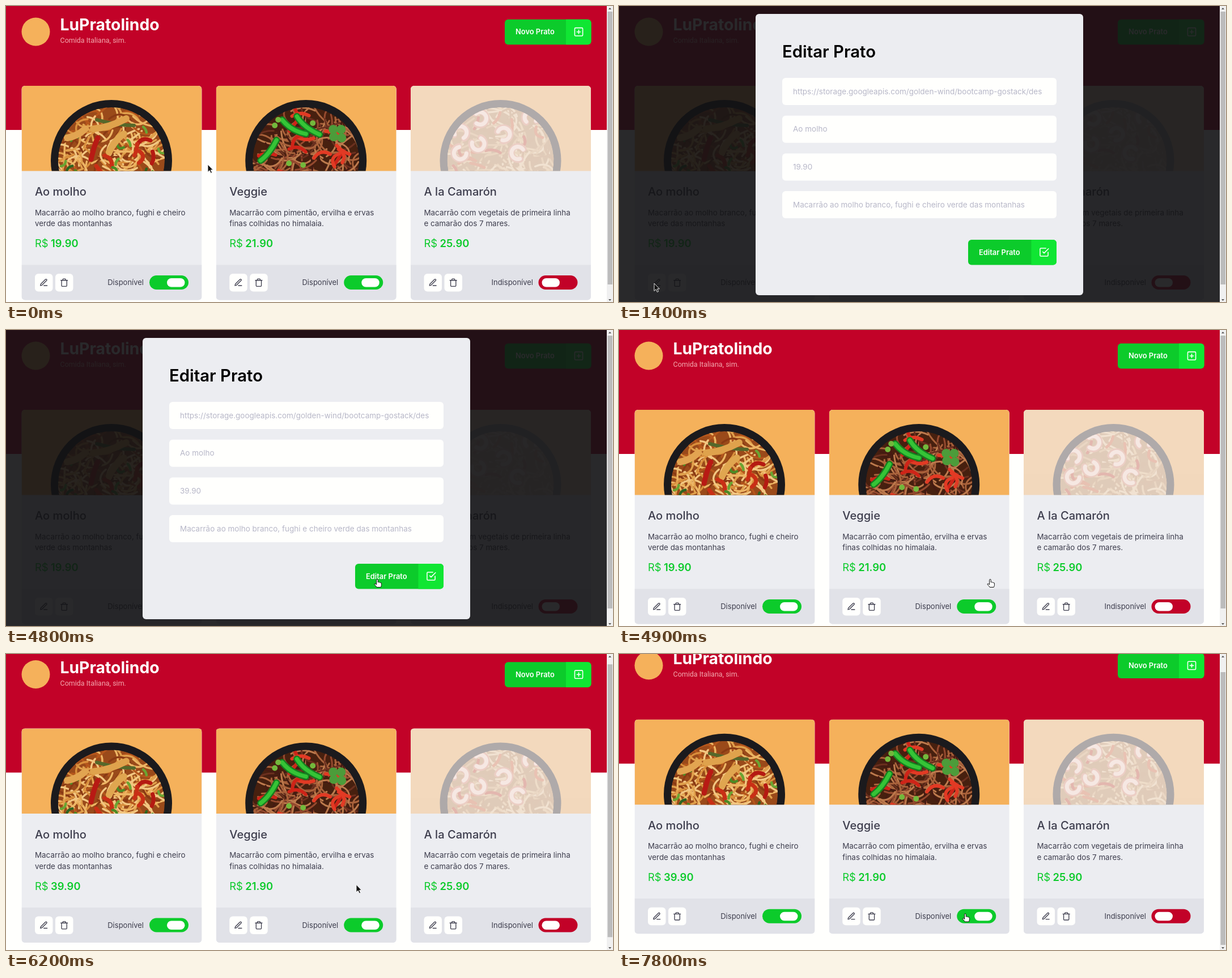
An HTML page for the animation above (8000 ms loop, 1071 by 523 pixels).

```html
<!DOCTYPE html>
<html lang="pt">
<head>
<meta charset="utf-8">
<title>Painel de pratos</title>
<style>
  html, body { margin: 0; width: 100%; height: 100%; overflow: hidden; background: #fffffd; }
  svg { display: block; }
  text { font-family: Inter, "Open Sans", sans-serif; font-size: 13.4px; fill: #3d3d4d; white-space: pre; }
  .brand { font-size: 28.3px; font-weight: 700; fill: #fff; }
  .tagline { font-family: Roboto, sans-serif; font-size: 12.5px; fill: #f3a9ae; }
  .dish { font-size: 20.1px; font-weight: 500; }
  .price { font-size: 18.4px; fill: #0ccb2b; }
  .bold { font-weight: 600; }
  .status { font-size: 13px; text-anchor: end; }
  .button { font-size: 12.9px; font-weight: 600; fill: #fff; }
  .heading { font-size: 29.3px; font-weight: 600; fill: #000; }
  .field { font-size: 13.5px; fill: #b7b7c8; }
  .icon { fill: none; stroke-width: 2; stroke-linecap: round; stroke-linejoin: round; }
</style>
</head>
<body>
<svg id="stage" width="1071" height="523" viewBox="0 0 1071 523"></svg>
<script>
const LOOP = 8000;
const GREEN = '#0ccb2b', RED = '#c20228', ORANGE = '#f5b15b';

const ICONS = {
  edit: 'M12 20h9M16.5 3.5a2.12 2.12 0 0 1 3 3L7 19l-4 1 1-4z',
  trash: 'M3 6h18M19 6v14a2 2 0 0 1-2 2H7a2 2 0 0 1-2-2V6m3 0V4a2 2 0 0 1 2-2h4a2 2 0 0 1 2 2v2',
  plus: 'M5 3h14a2 2 0 0 1 2 2v14a2 2 0 0 1-2 2H5a2 2 0 0 1-2-2V5a2 2 0 0 1 2-2zM12 8v8M8 12h8',
  check: 'M9 11l3 3L22 4M21 12v7a2 2 0 0 1-2 2H5a2 2 0 0 1-2-2V5a2 2 0 0 1 2-2h11'
};

const rect = (x, y, w, h, fill, r = 0, extra = '') =>
  `<rect x="${x}" y="${y}" width="${w}" height="${h}" rx="${r}" fill="${fill}" ${extra}/>`;
const text = (x, y, cls, content, extra = '') =>
  `<text x="${x}" y="${y}" class="${cls}" ${extra}>${content}</text>`;
const icon = (name, cx, cy, scale, color) =>
  `<path class="icon" d="${ICONS[name]}" stroke="${color}" transform="translate(${cx} ${cy}) scale(${scale}) translate(-12 -12)"/>`;
const line = (d, color, width) =>
  `<path d="${d}" fill="none" stroke="${color}" stroke-width="${width}" stroke-linecap="round"/>`;
const dots = (points, r, color) =>
  points.map(([x, y]) => `<circle cx="${x}" cy="${y}" r="${r}" fill="${color}"/>`).join('');
const pod = (d, width) => line(d, '#14801f', width) + line(d, '#35c436', width * 0.6);

function button(x, y, w, label, iconName) {
  return rect(x, y, w, 44.5, GREEN, 6) +
    `<path d="M${x + w - 44.5} ${y}h38.5a6 6 0 0 1 6 6v32.5a6 6 0 0 1-6 6h-38.5z" fill="#10e633"/>` +
    text(x + 19, y + 26.5, 'button', label) + icon(iconName, x + w - 22, y + 22, 0.785, '#fff');
}

function randomFrom(seed) {
  return () => {
    seed = (seed * 1664525 + 1013904223) % 4294967296;
    return seed / 4294967296;
  };
}

// Short curved strokes scattered over the bowl, which is centred on 0,0.
function strands(rand, count, length, width, colors) {
  let out = '';
  for (let i = 0; i < count; i++) {
    const angle = rand() * Math.PI * 2, radius = 92 * Math.sqrt(rand()), turn = rand() * Math.PI * 2;
    const dx = length * Math.cos(turn), dy = length * Math.sin(turn) * 0.8, bend = (rand() - 0.5) * 1.4;
    const x = radius * Math.cos(angle) - dx / 2, y = radius * Math.sin(angle) - dy / 2;
    const color = colors[Math.floor(rand() * colors.length)];
    const [a, b, c, d, e, f] = [x, y, dx / 2 - dy * bend, dy / 2 + dx * bend, dx, dy].map(v => v.toFixed(1));
    out += line(`M${a} ${b}q${c} ${d} ${e} ${f}`, color, width);
  }
  return out;
}

const FOODS = [
  r => strands(r, 200, 40, 3.4, ['#d98f3c', '#edb564', '#b5561c', '#f2c681', '#e0a04c', '#8a3a14']) +
    strands(r, 12, 26, 7, ['#b51a12', '#c92f16']) +
    strands(r, 20, 14, 4.5, ['#4d8a24', '#6ba432', '#2f6420']) +
    line('M-26 -72q36 10 66 10', '#55682a', 6) +
    line('M-32 -56q28-2 58-18', '#dfa24c', 12) + line('M-78 -40q18-3 32-16', '#e2a451', 12) +
    line('M-4 -15q12-24 26-32', '#e0a650', 12) + line('M-36 -2q6-26 12-38', '#b81a14', 9),
  r => strands(r, 200, 42, 3, ['#6b301f', '#94492e', '#a9623b', '#451a12', '#bd7a4d']) +
    strands(r, 18, 30, 6, ['#cf2418', '#e23a24']) +
    pod('M-42 -72q16 20 42 25', 12) + pod('M-16 -78q12 20 40 32', 12) + pod('M-80 0q16-12 28-36', 12) +
    dots([[48, -55], [62, -55], [49, -42], [63, -40]], 8, '#4c9c3a') +
    dots([[-55, -62], [-49, -72], [-30, 5], [-5, 8], [12, -66]], 5, '#73b83c'),
  r => strands(r, 190, 40, 3.4, ['#d9ab72', '#efcf9f', '#b9844e', '#e6bd83']) +
    strands(r, 18, 26, 5, ['#c2452e', '#d4673a', '#5f9038']) +
    [[-72, -50], [-36, -76], [-38, -30], [-70, -12], [30, -12], [52, -76], [5, -48]].map(([x, y], i) =>
      `<g transform="translate(${x} ${y}) rotate(${i * 67})">${line('M-10 5a12 12 0 1 1 18 6', '#dd8f74', 11)}${line('M-9 4a11 11 0 1 1 16 6', '#ffe3d4', 7)}</g>`).join('')
];

const DISHES = [
  { name: 'Ao molho', lines: ['Macarrão ao molho branco, fughi e cheiro', 'verde das montanhas'], price: '19.90', on: true },
  { name: 'Veggie', lines: ['Macarrão com pimentão, ervilha e ervas', 'finas colhidas no himalaia.'], price: '21.90', on: true },
  { name: 'A la Camarón', lines: ['Macarrão com vegetais de primeira linha', 'e camarão dos 7 mares.'], price: '25.90', on: false }
];

function card(dish, i) {
  const picture = `${rect(0, 0, 318, 150.5, '#f2ebe9')}<svg width="318" height="150.5" opacity="${dish.on ? 1 : 0.31}">
    ${rect(0, 0, 318, 151, ORANGE)}
    <g transform="translate(158.5 132)">
      <circle r="107" fill="#1b1a1d"/>
      <g clip-path="url(#bowl)"><circle r="94" fill="${['#9a4a1a', '#47200f', '#b88750'][i]}"/>${FOODS[i](randomFrom(11 + i * 31))}</g>
    </g></svg>`;
  const actions = ['edit', 'trash'].map((name, k) =>
    rect(23.5 + k * 36, 332, 31.5, 31.5, '#fffffd', 6) + icon(name, 39.2 + k * 36, 347.7, 0.66, '#3d3d4d')).join('');
  return `<g transform="translate(${27.5 + i * 343.25} 141)"><g clip-path="url(#card)">
    ${rect(0, 0, 318, 379, '#ecedf1')}${picture}${rect(0, 316.5, 318, 63, '#e1e2e8')}</g>
    ${text(23.5, 194, 'dish', dish.name)}
    ${dish.lines.map((s, k) => text(23.5, 228.5 + k * 19.5, '', s)).join('')}
    ${text(23.5, 285, 'price', 'R$')}${text(51.5, 285, 'price bold', dish.price, `id="price${i}"`)}
    ${actions}${text(dish.on ? 215.5 : 216, 352, 'status', dish.on ? 'Disponível' : 'Indisponível')}
    ${rect(225.5, 335, 69, 25, dish.on ? GREEN : RED, 12.5)}
    ${rect(dish.on ? 256.5 : 231.5, 340, 31.5, 15.5, '#fffffd', 7.75)}
  </g>`;
}

const FIELDS = [
  'https://storage.googleapis.com/golden-wind/bootcamp-gostack/des',
  'Ao molho', '19.90', 'Macarrão ao molho branco, fughi e cheiro verde das montanhas'
];

const modal = `<g id="modal">
  ${rect(0, 0, 1060, 523, 'rgba(18,18,20,.9)')}${rect(241, 14, 578, 497, '#ecedf1', 6)}
  ${text(288, 91, 'heading', 'Editar Prato')}
  ${FIELDS.map((_, i) => rect(288, 127 + i * 66.7, 484, 48, '#fffffd', 6)).join('')}
  <g clip-path="url(#inputs)">${FIELDS.map((s, i) => text(307, 155.7 + i * 66.7, 'field', s, `id="field${i}"`)).join('')}</g>
  ${rect(0, 275, 1.2, 19, '#555', 0, 'id="caret"')}
  ${button(616, 413, 156, 'Editar Prato', 'check')}</g>`;

const cursors = `<g id="cursor">
  <path id="arrow" d="M0 0V13.5L3.2 10.6L5.4 15.4L7.6 14.4L5.5 9.8H9.4Z" fill="#111" stroke="#fff" stroke-width=".9"/>
  <path id="hand" d="M-1.4 1.2a1.3 1.3 0 0 1 2.6 0V5.2q1.4-.9 2.3.3q1.4-.6 2.1.5q1.8-.3 1.8 1.5V10q0 2-1.2 4H-.8q-1.2-2.4-4-4.6q-.6-1.8 1.2-1.6l2.2 1.6z" fill="#fff" stroke="#111"/>
  <path id="beam" d="M-3-6.5h2.2l.8 .8l.8-.8H3M0-5.7V5.7M-3 6.5h2.2l.8-.8l.8 .8H3" fill="none" stroke="#333" stroke-width="1.2"/></g>`;

const $ = id => document.getElementById(id);

$('stage').innerHTML = `<defs>
    <clipPath id="card">${rect(0, 0, 318, 378.5, '#000', 6)}</clipPath>
    <clipPath id="bowl"><circle r="94"/></clipPath>
    <clipPath id="inputs">${rect(307, 120, 446, 260, '#000')}</clipPath>
  </defs>
  ${rect(0, 0, 1071, 523, '#fffffd')}
  <g id="page">${rect(0, -10, 1060, 229, RED)}
    <circle cx="52.5" cy="45.5" r="25" fill="${ORANGE}"/>
    ${text(95.5, 43, 'brand', 'LuPratolindo')}${text(95.5, 65, 'tagline', 'Comida Italiana, sim.')}
    ${button(880, 23.7, 152.5, 'Novo Prato', 'plus')}
    ${DISHES.map(card).join('')}</g>
  ${modal}
  ${rect(1060, 0, 11, 523, '#f0f0f0')}${rect(1061.5, 10, 8.5, 482, '#bcbcbc', 0, 'id="thumb"')}
  <path d="M1063 6h5l-2.5-3zM1063 518h5l-2.5 3z" fill="#555"/>
  ${cursors}`;

// time, x, y, pointer shape
const PATH = [
  [0, 356, 280, 'arrow'], [200, 356, 280, 'arrow'], [400, 336, 318, 'arrow'], [500, 336, 318, 'arrow'],
  [800, 190, 420, 'arrow'], [1000, 76, 484, 'arrow'], [1100, 62, 490, 'hand'], [1400, 62, 490, 'arrow'], [1500, 62, 490, 'arrow'],
  [1900, 300, 318, 'arrow'], [2100, 350, 274, 'beam'], [2300, 310, 278, 'beam'], [4200, 310, 278, 'beam'],
  [4400, 521, 403, 'arrow'], [4500, 521, 403, 'arrow'], [4700, 648, 438, 'hand'], [4800, 655, 440.5, 'hand'],
  [5400, 655, 440.5, 'hand'], [5500, 654, 430, 'arrow'], [5700, 648, 411, 'arrow'], [5800, 648, 411, 'arrow'], [6200, 618, 407.5, 'arrow'],
  [6600, 577, 404, 'arrow'], [6700, 577, 404, 'arrow'], [6900, 512, 446, 'arrow'], [7000, 566, 452, 'arrow'], [7100, 566, 452, 'arrow'],
  [7200, 640, 460, 'hand'], [7300, 708, 460, 'arrow'], [7400, 650, 460, 'hand'], [7500, 599, 460, 'hand'],
  [7700, 599, 460, 'hand'], [7800, 611, 459, 'hand']
];
const SCROLL = [[0, 0], [6000, 0], [6200, 9.5], [6400, 22], [6500, 25.3]];

function sample(keys, t) {
  const next = keys.findIndex(k => k[0] > t);
  if (next < 0) return keys[keys.length - 1];
  const a = keys[next - 1], b = keys[next], p = (t - a[0]) / (b[0] - a[0]);
  return a.map((v, i) => typeof v === 'number' ? v + (b[i] - v) * p : v);
}

const show = (id, visible) => $(id).setAttribute('visibility', visible ? 'visible' : 'hidden');
const within = (t, from, to) => t >= from && t < to;

function draw(now) {
  const t = Math.floor(now % LOOP / 100) * 100;
  const open = within(t, 1400, 4900);
  const [, scroll] = sample(SCROLL, t);
  const [, x, y, shape] = sample(PATH, t);

  $('modal').style.display = open ? '' : 'none';
  $('page').setAttribute('transform', `translate(0 ${-scroll})`);
  $('thumb').setAttribute('y', 10 + scroll * 0.87);
  $('price0').textContent = t < 5000 ? '19.90' : '39.90';

  $('field2').textContent = t < 3500 ? '19.90' : t < 3800 ? '9.90' : '39.90';
  $('caret').setAttribute('x', t < 3500 ? 311.5 : t < 3800 ? 307 : 315.5);
  $('caret').style.display = within(t, 2300, 2900) || within(t, 3400, 4300) ? '' : 'none';

  $('cursor').setAttribute('transform', `translate(${x} ${y})`);
  for (const id of ['arrow', 'hand', 'beam']) show(id, id === shape);
  requestAnimationFrame(() => draw(performance.now()));
}
draw(0);
</script>
</body>
</html>
```
